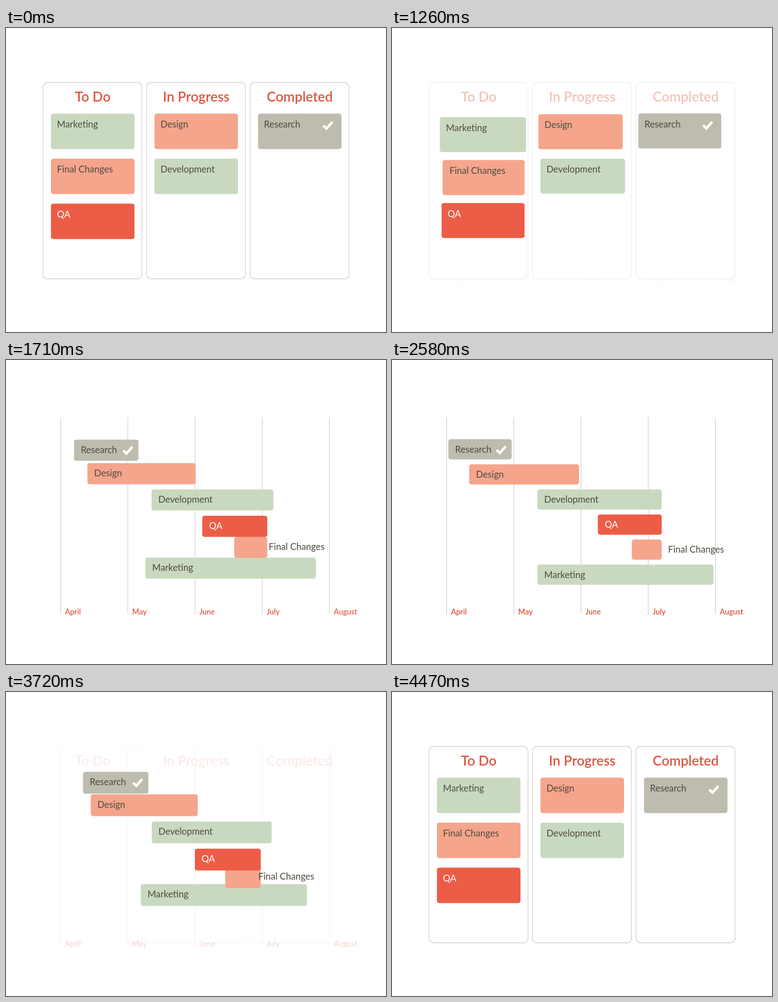
These frames come from a looping animation (837 by 669 pixels, 4500 ms). An HTML page:

```html
<!DOCTYPE html>
<html lang="en">
<head>
<meta charset="utf-8">
<title>Board to timeline</title>
<style>
  html, body { margin: 0; width: 100%; height: 100%; overflow: hidden; background: #fff; }
  svg { display: block; width: 837px; height: 669px; font-family: Lato, "Open Sans", sans-serif; }
  .line { fill: none; stroke: #cbcbcb; stroke-width: 1.3; }
  .title { font-size: 30px; font-weight: 600; fill: #e0553f; text-anchor: middle; }
  .month { font-size: 16.5px; font-weight: 600; fill: #d9523d; }
  .label { font-size: 20.2px; fill: #4d4a3f; }
  .check { fill: none; stroke: #fff; stroke-width: 5.5; }
</style>
</head>
<body>
<svg viewBox="0 0 837 669">
  <g id="board"></g>
  <g id="grid"></g>
  <g id="cards"></g>
</svg>
<script>
const LOOP = 4500, SPAN = 600;
const GREEN = '#c9d9c0', SALMON = '#f5a58c', RED = '#ec5d47', GREY = '#bebcae', INK = '#4d4a3f';
const [board, grid, layer] = ['board', 'grid', 'cards'].map(id => document.getElementById(id));

function setAttrs(el, attrs) {
  for (const key in attrs) el.setAttribute(key, attrs[key]);
}
function add(parent, tag, attrs, text = '') {
  const el = document.createElementNS('http://www.w3.org/2000/svg', tag);
  setAttrs(el, attrs);
  el.textContent = text;
  return parent.appendChild(el);
}

const columnX = i => 81.5 + 228 * i;
const monthX = m => 120.4 + 148 * m;

['To Do', 'In Progress', 'Completed'].forEach((name, i) => {
  const x = columnX(i);
  add(board, 'rect', { class: 'line', x, y: 120, width: 218, height: 432, rx: 10 });
  add(board, 'text', { class: 'title', x: x + 109.5, y: 161.5 }, name);
});
['April', 'May', 'June', 'July', 'August'].forEach((name, i) => {
  const x = monthX(i);
  add(grid, 'path', { class: 'line', d: `M${x} 126V559.5` });
  add(grid, 'text', { class: 'month', x: x + 9.6, y: 559.5 }, name);
});

// A pose holds the box, the label's anchor and the check mark's centre.
function boardPose({ column, slot }) {
  const x = columnX(column) + 17.5, y = 188.5 + 99 * slot;
  return { x, y, width: 184, height: 78, labelX: x + 13.3, labelY: y + 30.7, checkX: x + 154, checkY: y + 26.7 };
}
function timelinePose({ start, end, row }) {
  const x = monthX(start), y = 174.3 + 55.2 * row, width = monthX(end) - x;
  const indent = width < 100 ? width + 14 : 15; // a label too long for its bar goes after it
  return { x, y, width, height: 44.5, labelX: x + indent, labelY: y + 29.3, checkX: x + width - 23, checkY: y + 24.2 };
}

// Back to front; start and end count months from April.
const cards = [
  { name: 'Marketing', fill: GREEN, column: 0, slot: 0, row: 5, start: 1.35, end: 3.97 },
  { name: 'Final Changes', fill: SALMON, column: 0, slot: 1, row: 4, start: 2.755, end: 3.2 },
  { name: 'Design', fill: SALMON, column: 1, slot: 0, row: 1, start: 0.335, end: 1.97 },
  { name: 'Development', fill: GREEN, column: 1, slot: 1, row: 2, start: 1.35, end: 3.2 },
  { name: 'QA', fill: RED, ink: '#fff', column: 0, slot: 2, row: 3, start: 2.25, end: 3.2 },
  { name: 'Research', fill: GREY, done: true, column: 2, slot: 0, row: 0, start: 0.025, end: 0.967 }
].map(card => ({
  from: boardPose(card),
  to: timelinePose(card),
  box: add(layer, 'rect', { fill: card.fill, rx: 5 }),
  label: add(layer, 'text', { class: 'label', style: `fill: ${card.ink || INK}` }, card.name),
  check: card.done && add(layer, 'path', { class: 'check', d: 'M-10 -.5L-3 6.2L10 -8.5' })
}));

function ease(t, start) {
  const u = Math.min(1, Math.max(0, (t - start) / SPAN));
  return u * u * (3 - 2 * u);
}

function draw(t) {
  const p = ease(t, 1200) - ease(t, 3600);
  board.setAttribute('opacity', 1 - ease(t, 900) + ease(t, 3600));
  grid.setAttribute('opacity', ease(t, 1200) - ease(t, 3300));
  for (const { from, to, box, label, check } of cards) {
    const at = key => from[key] + (to[key] - from[key]) * p;
    for (const key of ['x', 'y', 'width', 'height']) box.setAttribute(key, at(key));
    setAttrs(label, { x: at('labelX'), y: at('labelY') });
    if (check) check.setAttribute('transform', `translate(${at('checkX')} ${at('checkY')})`);
  }
}

const begin = performance.now();
function play() {
  draw((performance.now() - begin) % LOOP);
  requestAnimationFrame(play);
}
play();
</script>
</body>
</html>
```
